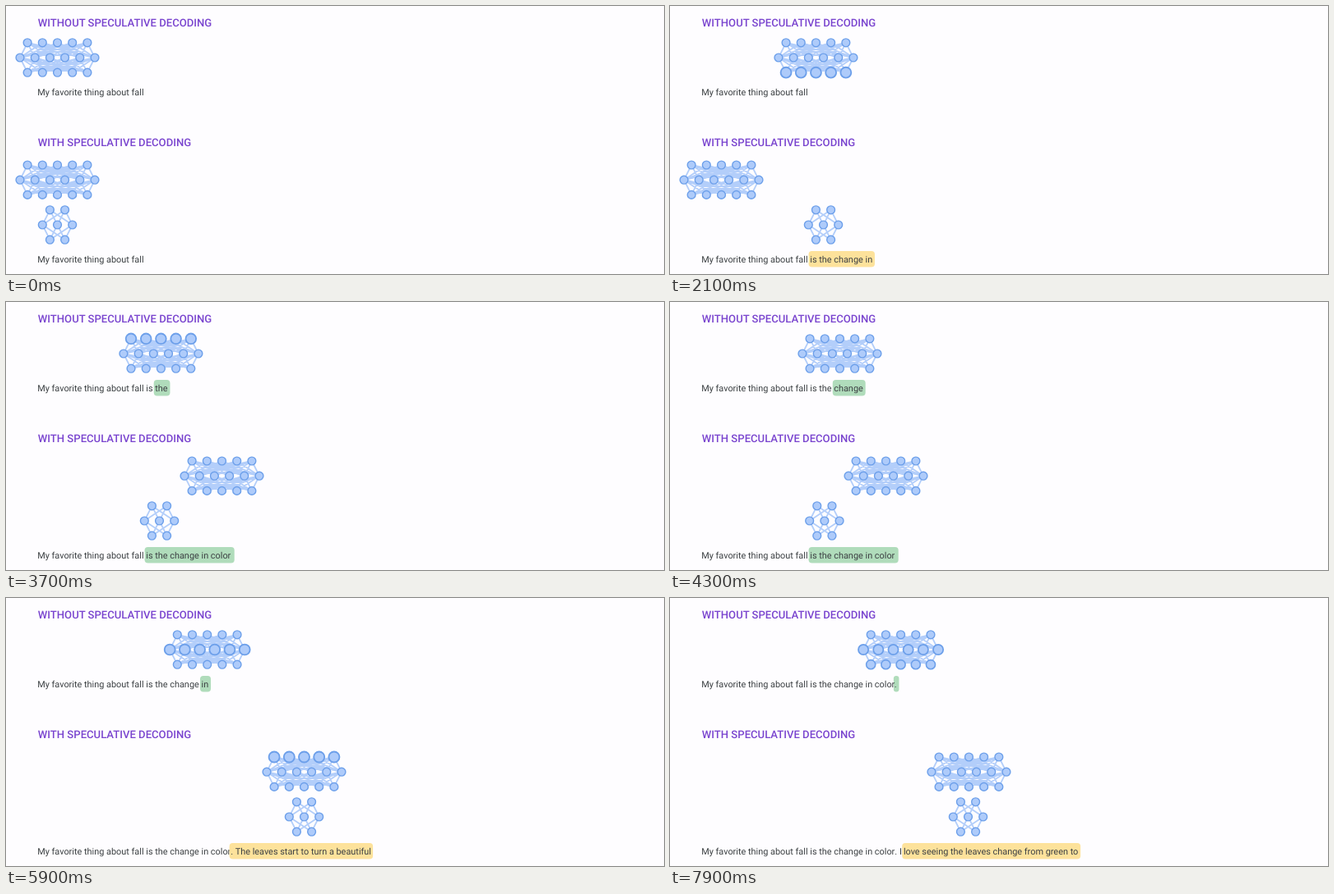
An HTML page with a canvas that plays this animation: 800 by 327 pixels, repeating every 8000 ms.

```html
<!DOCTYPE html>
<html lang="en">
<head>
<meta charset="utf-8">
<title>Speculative decoding</title>
<style>
  html, body { margin: 0; width: 100%; height: 100%; overflow: hidden; background: #fefdff; }
  canvas { display: block; width: 800px; height: 327px; }
</style>
</head>
<body>
<canvas id="stage"></canvas>
<script>
const W = 800, H = 327, LOOP = 8000;
const canvas = document.getElementById('stage');
const ctx = canvas.getContext('2d');
const dpr = window.devicePixelRatio || 1;
canvas.width = W * dpr;
canvas.height = H * dpr;

const COLOR = {
  bg: '#fefdff', title: '#7a45cf', text: '#3c4043',
  node: '#aecbfa', rim: '#6c9fea', edge: '#b3cefa',
  draft: '#fde29b', accept: '#b0dcbb'
};
const BODY = '10.9px Roboto, sans-serif';
const TITLE = '500 13.1px Roboto, sans-serif';
const LEFT = 38.2, GAP = 18.2;
const PROMPT = 'My favorite thing about fall';

const clamp = v => Math.min(1, Math.max(0, v));
const ramp = (t, start, length) => clamp((t - start) / length);
const ease = p => p < .5 ? 4 * p ** 3 : 1 - 4 * (1 - p) ** 3;
const glide = (t, start, length, a, b) => a + (b - a) * ease(ramp(t, start, length));
const pulse = (t, start, length) => Math.sin(Math.PI * ramp(t, start, length));

function endX(text) {
  ctx.font = BODY;
  return LEFT + ctx.measureText(text).width;
}

function write(text, x, y, font = BODY, color = COLOR.text) {
  ctx.font = font;
  ctx.fillStyle = color;
  ctx.fillText(text, x, y);
}

function mark(x0, x1, y, color) {
  if (x1 - x0 < 1) return;
  ctx.fillStyle = color;
  ctx.beginPath();
  ctx.roundRect(x0, y - 13.8, x1 - x0, 19.6, Math.min(4, (x1 - x0) / 2));
  ctx.fill();
}

// Three rows of nodes: n - 1, n, n - 1. grow holds a swell of 0..1 per row.
function network(cx, cy, n, grow) {
  const rows = [n - 1, n, n - 1].map((count, r) =>
    Array.from({ length: count }, (_, i) => [cx + (i - (count - 1) / 2) * GAP, cy + (r - 1) * 18.2]));
  ctx.strokeStyle = COLOR.edge;
  ctx.lineWidth = 1.8;
  ctx.beginPath();
  for (const [x, y] of rows[1])
    for (const [u, v] of [...rows[0], ...rows[2]]) {
      ctx.moveTo(x, y);
      ctx.lineTo(u, v);
    }
  ctx.stroke();
  ctx.fillStyle = COLOR.node;
  ctx.strokeStyle = COLOR.rim;
  rows.forEach((row, r) => {
    const scale = 1 + .33 * grow[r];
    ctx.lineWidth = 1.4 * scale;
    for (const [x, y] of row) {
      ctx.beginPath();
      ctx.arc(x, y, 4.9 * scale, 0, 2 * Math.PI);
      ctx.fill();
      ctx.stroke();
    }
  });
}

const wave = (t, start, lag, length) => [0, 1, 2].map(r => pulse(t, start + r * lag, length));
const sumWaves = list => [0, 1, 2].map(r => Math.max(...list.map(w => w[r])));

// One token per pass of the large network.
const TOKENS = [' is', ' the', ' change', ' in', ' color', '.', ' I'];
const FIRST = 1985, PERIOD = 980;

function tokenStart(k) {
  const before = PROMPT + TOKENS.slice(0, k).join('');
  return endX(before + (TOKENS[k][0] === ' ' ? ' ' : ''));
}

function plainDecoding(t) {
  const y = 108.8;
  let cx = glide(t, 1350, 430, 62.5, tokenStart(0) + 7.2);
  let text = PROMPT, box = null;
  const waves = [];
  TOKENS.forEach((token, k) => {
    const at = FIRST + k * PERIOD;
    waves.push(wave(t, at - 340, 170, 280));
    if (k && t > at) {
      const a = tokenStart(k - 1), b = tokenStart(k);
      cx = glide(t, at, 230, a, b) + 7.2;
      box[0] = glide(t, at, 230, a, b) - 1.5;
    }
    if (t >= at + 265) {
      text += token;
      box = [tokenStart(k) - 1.5, endX(text) + 2.9];
    }
  });
  if (box) mark(box[0], box[1], y, COLOR.accept);
  network(cx, 63, 6, sumWaves(waves));
  write(text, LEFT, y);
}

// Each round: the small network drafts words, the large one checks them.
const ROUNDS = [
  { start: 1350, lead: 540, check: 2530, base: PROMPT, kept: ' is the change in color', pad: 4.4,
    draft: [' is', ' the', ' change', ' in', ' the', ' leaves.', ' The', ' trees'] },
  { start: 4245, lead: 540, check: 5400, base: PROMPT + ' is the change in color', kept: '. I', pad: 2.6,
    draft: ['. The', ' leaves', ' start', ' to', ' turn', ' a', ' beautiful'] },
  { start: 7100, lead: 150, check: 7810, base: PROMPT + ' is the change in color. I', kept: '', pad: 0,
    draft: [' love', ' seeing', ' the', ' leaves', ' change', ' from', ' green', ' to'] }
];
const SMALL_X = [62.5, 186.5, 362.5, 362.5];
const BIG_X = [62.5, 262.5, 362.5, 391];

function phrase(base, text, y, color, pad, alpha, textAlpha = alpha) {
  const x = endX(base + (text[0] === ' ' ? ' ' : ''));
  ctx.globalAlpha = alpha;
  mark(x - 1.7, endX(base + text) + pad, y, color);
  ctx.globalAlpha = textAlpha;
  write(text.trimStart(), x, y);
  ctx.globalAlpha = 1;
}

function speculativeDecoding(t) {
  const y = 312.7;
  let small = SMALL_X[0], big = BIG_X[0];
  const smallWaves = [], bigWaves = [];
  ROUNDS.forEach((round, i) => {
    const { start, lead, check, base, kept, pad, draft } = round;
    const result = check + 840;
    if (t > start) small = glide(t, start, 450, SMALL_X[i], SMALL_X[i + 1]);
    if (t > check) big = glide(t, check, 450, BIG_X[i], BIG_X[i + 1]);
    smallWaves.push(wave(t, start + lead - 330, 80, 240));
    bigWaves.push(wave(t, check + 360, 170, 280));

    const count = Math.floor((t - start - lead) / 60) + 1;
    const fade = ramp(t, result, 200);
    if (count > 0 && fade < 1)
      phrase(base, draft.slice(0, count).join(''), y, COLOR.draft, 2.8, 1 - fade);
    if (kept && fade > 0) {
      const next = ROUNDS[i + 1].start;
      const gone = ramp(t, next + 60, 90);
      phrase(base, kept, y, COLOR.accept, pad, fade * (1 - gone), fade);
    }
  });
  network(big, 212.2, 6, sumWaves(bigWaves));
  network(small, 267, 3, sumWaves(smallWaves));
  write(PROMPT, LEFT, y);
}

function draw(now) {
  const t = now % LOOP;
  ctx.setTransform(dpr, 0, 0, dpr, 0, 0);
  ctx.textRendering = 'geometricPrecision';
  ctx.fillStyle = COLOR.bg;
  ctx.fillRect(0, 0, W, H);
  write('WITHOUT SPECULATIVE DECODING', 38.8, 24.8, TITLE, COLOR.title);
  write('WITH SPECULATIVE DECODING', 38.8, 170.6, TITLE, COLOR.title);
  plainDecoding(t);
  speculativeDecoding(t);
}

const began = performance.now();
function tick() {
  draw(performance.now() - began);
  requestAnimationFrame(tick);
}
tick();
</script>
</body>
</html>
```
